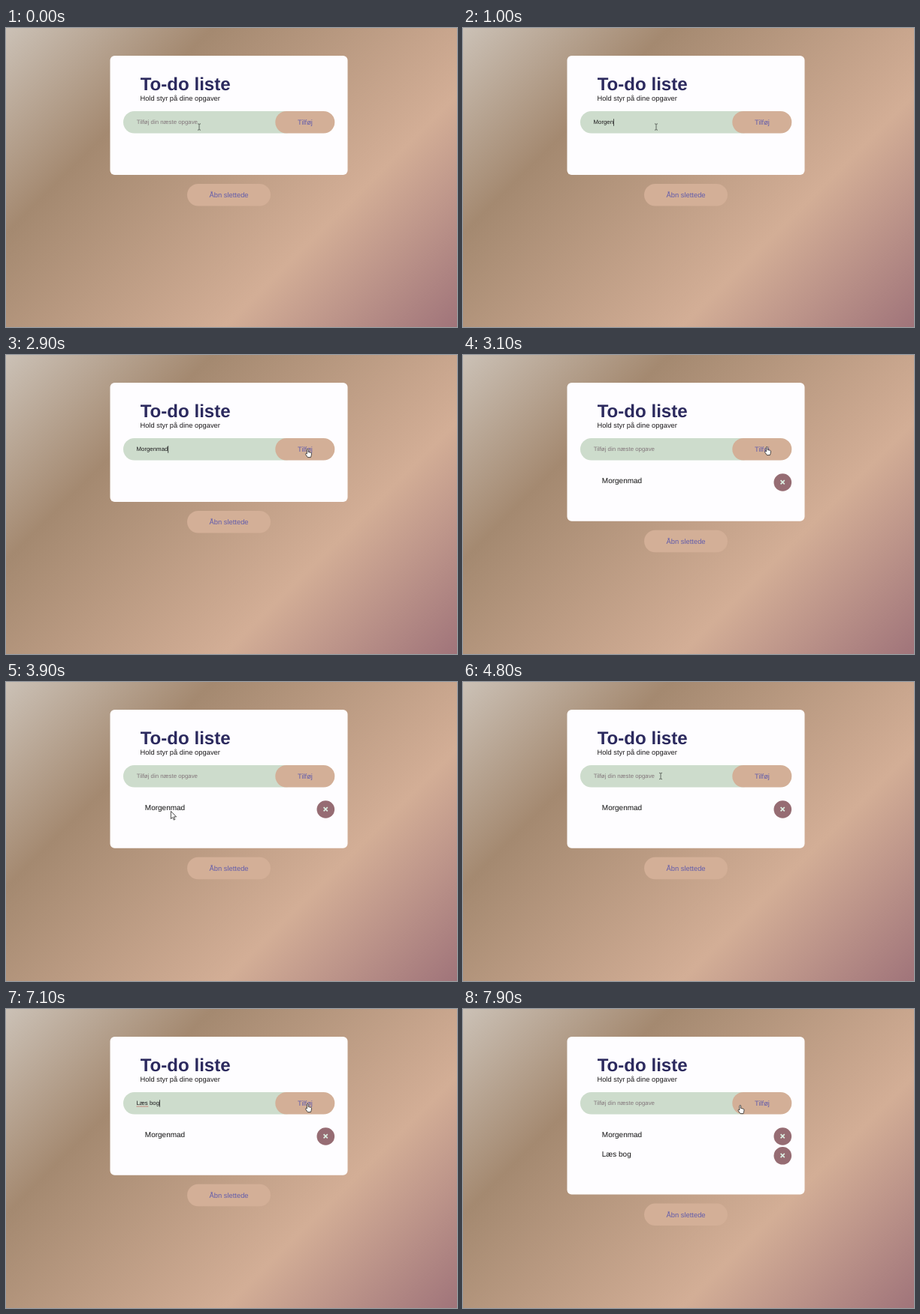
Recreate the animation shown at these times as an HTML page. Size 600x399 px, loop 8000 ms.

```html
<!DOCTYPE html>
<html lang="da">
<head>
<meta charset="utf-8">
<title>To-do liste</title>
<style>
  html, body { margin: 0; width: 100%; height: 100%; overflow: hidden; }
  body { background: linear-gradient(135deg, #cbc1b6 0%, #a48970 27.5%, #d3ae96 69%, #a0747a 100%); }
  svg { display: block; width: 600px; height: 399px; }
  text {
    font: 9.35px "Liberation Sans", Arial, sans-serif;
    text-rendering: geometricPrecision;
    white-space: pre;
    fill: #1c1a1c;
  }
  .title { font-size: 24.1px; font-weight: bold; fill: #2c2a5e; }
  .field { font-size: 7.85px; }
  .hint { fill: #82757a; }
  .label { fill: #625cab; text-anchor: middle; }
  .task { font-size: 10px; fill: #111; }
  .tan { fill: #d3af97; }
  .spell { stroke: #c2504c; stroke-width: 1; stroke-dasharray: 1.2 .8; }
  .cross { stroke: #dcefe2; stroke-width: 1.7; }
  .pointer { fill: #fff; stroke: #222; stroke-width: .8; stroke-linejoin: round; }
  .beam { fill: none; stroke: #555b55; stroke-width: .9; }
</style>
</head>
<body>
<svg viewBox="0 0 600 399">
  <rect id="card" x="138.5" y="37" width="316" height="159" rx="6" fill="#fefdff"/>
  <text class="title" x="178.7" y="83">To-do liste</text>
  <text x="178.4" y="97">Hold styr på dine opgaver</text>

  <rect x="156" y="111" width="230" height="29.5" rx="14.75" fill="#cddccc"/>
  <rect class="tan" x="358.3" y="111" width="79" height="29.5" rx="14.75"/>
  <text class="label" x="398" y="129">Tilføj</text>

  <text class="field hint" id="hint" x="173.7" y="128.4">Tilføj din næste opgave</text>
  <text class="field" id="entry" x="173.5" y="128.4"></text>
  <path class="spell" id="spell"/>
  <rect id="caret" y="121.3" width=".8" height="9.4" fill="#222"/>

  <g id="tasks"></g>

  <g id="trash">
    <rect class="tan" x="241" y="208" width="111" height="29.5" rx="14.75"/>
    <text class="label" x="296.6" y="226">Åbn slettede</text>
  </g>

  <path id="cursor"/>
</svg>
<script>
const LOOP = 8000, TICK = 100, ROW = 25.8, TEXT_X = 173.5;
const $ = id => document.getElementById(id);

const shapes = {
  beam: "M-2-4.2Q0-4.2 0-3.2Q0-4.2 2-4.2M0-3.2V3.2M-2 4.2Q0 4.2 0 3.2Q0 4.2 2 4.2",
  arrow: "M.4.4V10.6L2.7 8.5 4.3 12.1 5.8 11.4 4.3 7.9H7.6Z",
  hand: "M2.4 7V1.4a.9.9 0 0 1 1.8 0V4.5l3.1.7q1.3.3 1.2 1.6L8.1 9.4 7.4 11.6H3.4L.7 7.8Q.2 6.8 1 6.4 1.7 6.2 2.4 7Z"
};

// Each track holds [start ms, ...value], kept until the next entry.
const moves = [
  [0, "beam", 257, 132],
  [2100, "beam", 272, 133], [2200, "beam", 318, 137],
  [2300, "arrow", 360, 144], [2400, "arrow", 378, 147],
  [2800, "hand", 388, 130], [2900, "hand", 398, 125], [3000, "hand", 401, 122],
  [3200, "hand", 398, 124], [3300, "arrow", 372, 143], [3400, "arrow", 310, 164],
  [3500, "arrow", 255, 175], [3600, "arrow", 230, 177], [3700, "arrow", 217, 177],
  [3900, "arrow", 219, 172], [4000, "arrow", 228, 158], [4100, "arrow", 240, 145],
  [4200, "beam", 255, 133], [4300, "beam", 261, 128], [4400, "beam", 263, 125.5],
  [6400, "beam", 315, 131], [6500, "arrow", 374, 140], [6600, "hand", 374, 127],
  [6800, "arrow", 405, 105], [7000, "hand", 400, 124], [7100, "hand", 398, 126],
  [7600, "hand", 388, 123], [7700, "hand", 380, 126], [7900, "hand", 365.5, 128]
];
const typing = [
  [0, ""], [100, "M"], [300, "Mor"], [400, "Morg"], [600, "Morgen"],
  [1200, "Morgenma"], [1500, "Morgenmad"], [3000, ""],
  [5000, "L"], [5200, "Læ"], [5400, "Læs"], [5500, "Læs "],
  [5700, "Læs bo"], [5900, "Læs bog"], [7300, ""]
];
const caretOn = [[100, 2000], [2400, 3000], [4400, 4800], [5000, 6400], [7000, 7300]];
const spellOn = [[400, 1000], [5500, 7300]];
const added = [[3000, "Morgenmad"], [7300, "Læs bog"]];

const at = (track, t) => track.findLast(step => step[0] <= t);
const within = (spans, t) => spans.some(([from, to]) => t >= from && t < to);
const show = (el, on) => el.setAttribute("visibility", on ? "visible" : "hidden");

$("tasks").innerHTML = added.map(([, name], i) => `
  <g transform="translate(0 ${i * ROW})">
    <text class="task" x="184.8" y="171">${name}</text>
    <circle cx="425.3" cy="170" r="11.8" fill="#966c73"/>
    <path class="cross" d="M422.6 167.1l5.2 5.2m0-5.2l-5.2 5.2"/>
  </g>`).join("");
const rows = [...$("tasks").children];

function render(t) {
  const count = added.filter(([start]) => start <= t).length;
  rows.forEach((row, i) => show(row, i < count));
  $("card").setAttribute("height", 159 + count * ROW);
  $("trash").setAttribute("transform", `translate(0 ${count * ROW})`);

  const entry = $("entry"), text = at(typing, t)[1];
  entry.textContent = text;
  show($("hint"), !text);

  const width = text ? entry.getComputedTextLength() : 0;
  $("caret").setAttribute("x", TEXT_X + width);
  show($("caret"), within(caretOn, t));

  const word = text.split(" ")[0].length;
  const wordWidth = word ? entry.getSubStringLength(0, word) : 0;
  $("spell").setAttribute("d", `M${TEXT_X + .4} 130h${wordWidth}`);
  show($("spell"), within(spellOn, t));

  const [, kind, x, y] = at(moves, t), cursor = $("cursor");
  cursor.setAttribute("class", kind === "beam" ? "beam" : "pointer");
  cursor.setAttribute("d", shapes[kind]);
  cursor.setAttribute("transform", `translate(${x} ${y})`);
}

let last = -1;
function loop() {
  const t = Math.floor(performance.now() % LOOP / TICK) * TICK;
  if (t !== last) render(last = t);
  requestAnimationFrame(loop);
}
loop();
</script>
</body>
</html>
```
